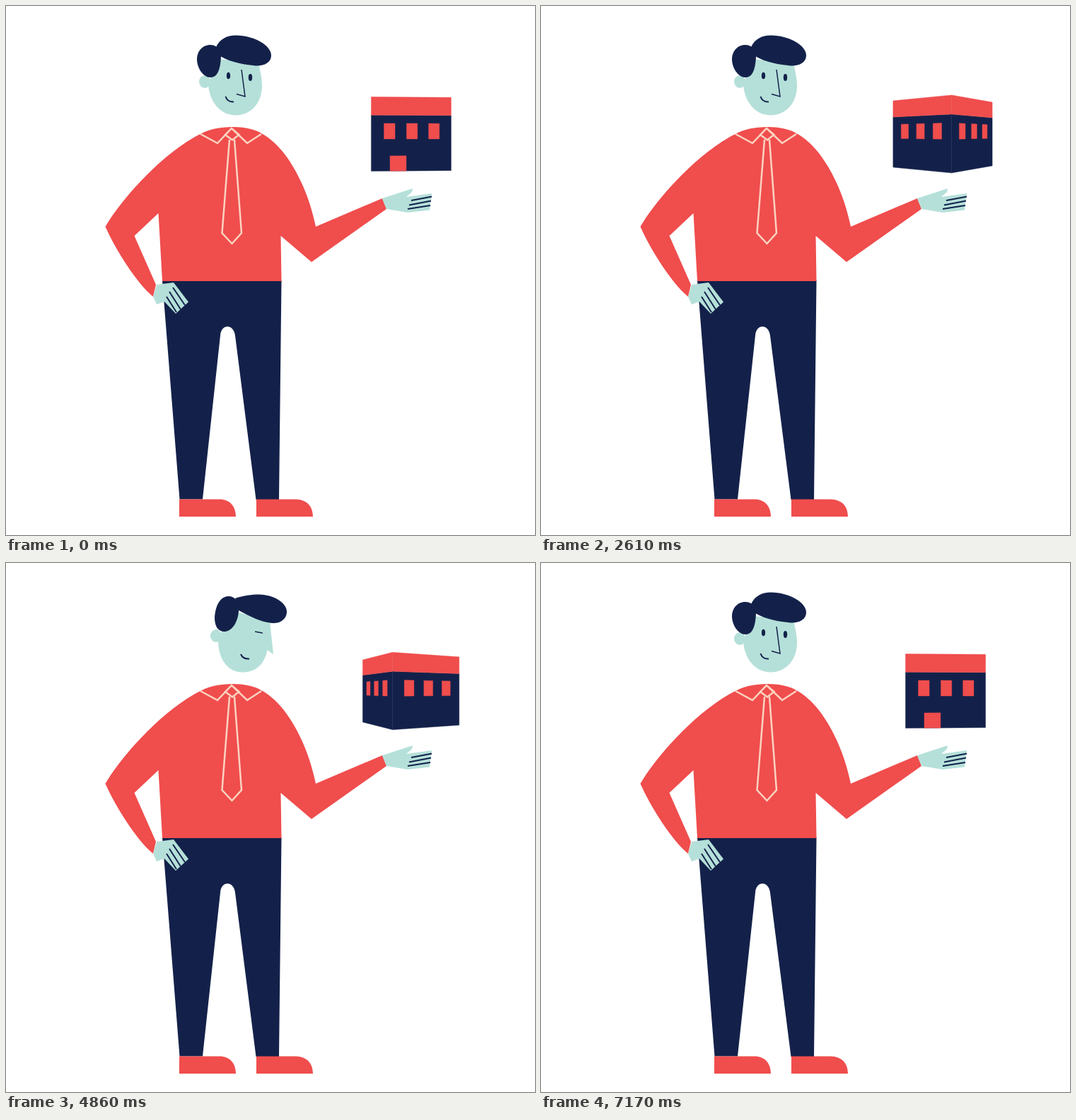
Write an HTML page that moves like this. It is 748 by 748 pixels and loops after 7200 ms.

```html
<!DOCTYPE html>
<html lang="en">
<head>
<meta charset="utf-8">
<title>Man presenting a rotating building</title>
<style>
html, body { margin: 0; width: 100%; height: 100%; overflow: hidden; background: #fff; }
svg { display: block; width: 100vw; height: 100vh; }
.red { fill: #f04d4d; }
.navy { fill: #13214a; }
.skin { fill: #b5e0d9; }
.trim { fill: none; stroke: #fbd3c0; stroke-width: 2.5; }
.line { fill: none; stroke: #13214a; stroke-width: 2; }
.thin { stroke-width: 1.5; }
#building path { stroke-width: .4; }
</style>
</head>
<body>
<svg viewBox="0 0 748 748">
  <path class="navy" d="M221 388H389.5L386 698H353.5L324 466C322 449 304 449 303 466L278 697.5H245.5Z"/>
  <path class="red" d="M245 697.5H302C316 697.5 325 707 325 722H245ZM354 697.5H410C425 698 434 707 434 722H354Z"/>
  <path class="red" d="M140.5 312C165 270 225 205 275 181C295 169 340 167 361 180C395 198 425 250 438 312L532 272L538 287L432 362L388.5 325L389.5 389H221L215.5 293L181.5 325L212 394L208 411C185 392 155 345 140.5 312Z"/>
  <path class="trim" d="M275 181L299 194L319 173L341 194L361 181M319 173L329.5 182L320 189.5L310 182ZM316 189L305.5 321L319.5 336L333 321L323 189"/>
  <path class="skin" d="M532 272L575 258L574 263L566 270L602 265L599 288.5L568 292L538 287ZM213 394L237 391L258 418.5L240 435L224 418L213 422L208 411Z"/>
  <path class="line" d="M573 275L602 269.5M570 281.5L601 275.5M568 287L600 282M236 398L253 423M231 404L247 429M227 411L241 433"/>
  <g id="head">
    <ellipse class="skin" id="ear" rx="8" ry="9"/>
    <path class="skin" id="face"/>
    <path class="navy" id="bun"/>
    <path class="navy" id="hair"/>
    <path class="line thin" id="nose"/>
    <path class="line" id="smile"/>
    <path class="navy" id="open"/>
    <g id="eyeL"><ellipse class="navy" rx="2.6" ry="4.8"/><path class="line thin" d="M-5.5 -.4L5.5 .4"/></g>
    <g id="eyeR"><ellipse class="navy" rx="2.7" ry="5"/><path class="line thin" d="M-5.5 -.4L5.5 .4"/></g>
  </g>
  <g id="building"></g>
</svg>
<script>
const LOOP = 7200;
const $ = id => document.getElementById(id);

// Every pose uses the same path structure, so the numbers can be blended.
const poses = {
  front: {
    ear: '281 107', eyeL: '314.5 98.5 0', eyeR: '345.5 101 0',
    face: 'M300 75L357 80L361 100L362 110C363 138 345 154.5 325 154.5C302 154.5 287 134 286 110Z',
    bun: 'M289 55C277 55 270 65 270 75C270 88 279 101 289 101C299 101 303 90 304 72C303 60 297 55 289 55Z',
    hair: 'M297 58C302 47 312 41.5 325 41.5C352 42 375 56 375 70C375 80 365 85 353 84.5C338 83 318 80 303 71Z',
    nose: 'M333 90L338 128L326 124.5',
    smile: 'M310.5 128Q313 136 322 135.5',
    open: 'M310 127L324 131C323 136 320 140 316 140C312 139 309 134 310 127Z'
  },
  left: {
    ear: '269.5 121', eyeL: '298.5 104 -10', eyeR: '328.5 97.5 -10',
    face: 'M285 88L336 78L346 94L350 110C354 138 334 156 314 156C294 156 277 145 275 115Z',
    bun: 'M265 69C254 69 248 78 248 89C249 103 259 114 270 114.5C280 114 284 104 284 92C282 82 276 70 265 69Z',
    hair: 'M270 74C271 53 288 43.5 312 43.5C336 43.5 348.5 52 348.5 63C348.5 74 335 81 318 82C300 83 285 81 274 79Z',
    nose: 'M313.5 90.5L329 126L317.5 124.5',
    smile: 'M299 134Q303 143 312 142',
    open: 'M302 130L315 136C314 142 311 146 306 146C301 145 299 142 300 138Z'.replace('C301 145 299 142 300 138', 'C300 145 297 140 302 130')
  },
  up: {
    ear: '282 114', eyeL: '309 92 -5', eyeR: '338 90.5 -5',
    face: 'M300 65L349 72L368 112L357 110C356 138 342 152.5 324 152.5C304 152.5 289 137 288 118Z',
    bun: 'M287 54C276 54 271 65 271 79C271 95 277 105 287 105C297 105 303 95 303 80C303 64 298 54 287 54Z',
    hair: 'M292 55C306 44 324 36 340 36C357 36 367 45 367 55C366 67 355 73 341 73C328 73 313 71 300 68Z',
    nose: 'M345 85L366 112L352 110',
    smile: 'M323 127Q326 135 335 134',
    open: 'M323 125L338.5 128C338 134 335 137.5 330 137.5C325 137 322 132 323 125Z'
  },
  right: {
    ear: '297 103', eyeL: '327 95 6', eyeR: '357.5 98 6',
    face: 'M315 66L373 82L378 129L369.5 123C365 145 352 154.5 334 154.5C315 154.5 301 138 300 112Z',
    bun: 'M314 47C302 48 296 61 295 77C295 90 300 97 309 97C321 96 328 82 329 68C329 55 325 47 314 47Z',
    hair: 'M324 50C336 46 347 44.5 358 44.5C380 45 397 57 397 69C397 79 388 86 376 85C360 83.5 344 75 329 67Z',
    nose: 'M362 90L376 129L364 126',
    smile: 'M332 129Q335 136 344 135.5',
    open: 'M333 127L348 132C347 137 344 140 340 140C335 139 332 134 333 127Z'
  }
};

// [start time, pose reached MOVE ms later]
const MOVE = 360;
const moves = [[330, 'left'], [1740, 'front'], [2635, 'up'], [3960, 'right'], [5705, 'up'], [6345, 'front']];
const blinks = [1250, 3450, 4800];
const BLINK = 130;

const ease = p => p < .5 ? 2 * p * p : 1 - 2 * (1 - p) ** 2;

function blend(a, b, p) {
  const to = b.match(/-?[\d.]+/g);
  let i = 0;
  return a.replace(/-?[\d.]+/g, n => (+n + (to[i++] - n) * p).toFixed(2));
}

function show(el, on) {
  el.style.display = on ? '' : 'none';
}

function drawHead(t) {
  let from = 'front', to = 'front', p = 1;
  for (const [start, pose] of moves) {
    if (t < start) break;
    from = to;
    to = pose;
    p = ease(Math.min(1, (t - start) / MOVE));
  }
  const mix = key => blend(poses[from][key], poses[to][key], p);
  for (const key of ['face', 'bun', 'hair', 'nose', 'smile', 'open']) $(key).setAttribute('d', mix(key));
  $('ear').setAttribute('transform', `translate(${mix('ear')})`);

  const closed = blinks.some(b => t >= b && t < b + BLINK);
  for (const id of ['eyeL', 'eyeR']) {
    const [x, y, turn] = mix(id).split(' ');
    const eye = $(id);
    eye.setAttribute('transform', `translate(${x} ${y}) rotate(${turn})`);
    show(eye.children[0], !closed);
    show(eye.children[1], closed);
  }

  const look = p < .5 ? from : to;
  const profile = look === 'up' || look === 'right';
  const talking = look === 'left' || look === 'up';
  show($('nose'), !profile);
  show($('eyeL'), !profile);
  show($('open'), talking);
  show($('smile'), !talking);
}

const HALF = 50, DEPTH = 425, CX = 569.5, CY = 181;

// Rectangle on a wall turned by angle a, in perspective.
function panel(a, u0, u1, v0, v1, color) {
  const s = Math.sin(a), c = Math.cos(a);
  const at = (u, v) => {
    const k = DEPTH / (DEPTH - HALF * c + u * s);
    return `${(CX + (HALF * s + u * c) * k).toFixed(2)} ${(CY + v * k).toFixed(2)}`;
  };
  return `<path fill="${color}" stroke="${color}" d="M${at(u0, v0)}L${at(u1, v0)}L${at(u1, v1)}L${at(u0, v1)}Z"/>`;
}

function drawBuilding(t) {
  const red = '#f04d4d', navy = '#13214a';
  let out = '';
  for (let side = 0; side < 4; side++) {
    const a = (4 - .05035 * t + 90 * side) * Math.PI / 180;
    if (Math.cos(a) <= HALF / DEPTH) continue;
    out += panel(a, -HALF, HALF, -23.4, 46, navy) + panel(a, -HALF, HALF, -46, -23.4, red);
    for (const u of [-34.2, -6.2, 21.5]) out += panel(a, u, u + 13.6, -13.2, 6.2, red);
    if (!side) out += panel(a, -26.8, -6.6, 27.2, 46, red);
  }
  $('building').innerHTML = out;
}

function frame() {
  const t = performance.now() % LOOP;
  drawHead(t);
  drawBuilding(t);
  requestAnimationFrame(frame);
}
frame();
</script>
</body>
</html>
```
